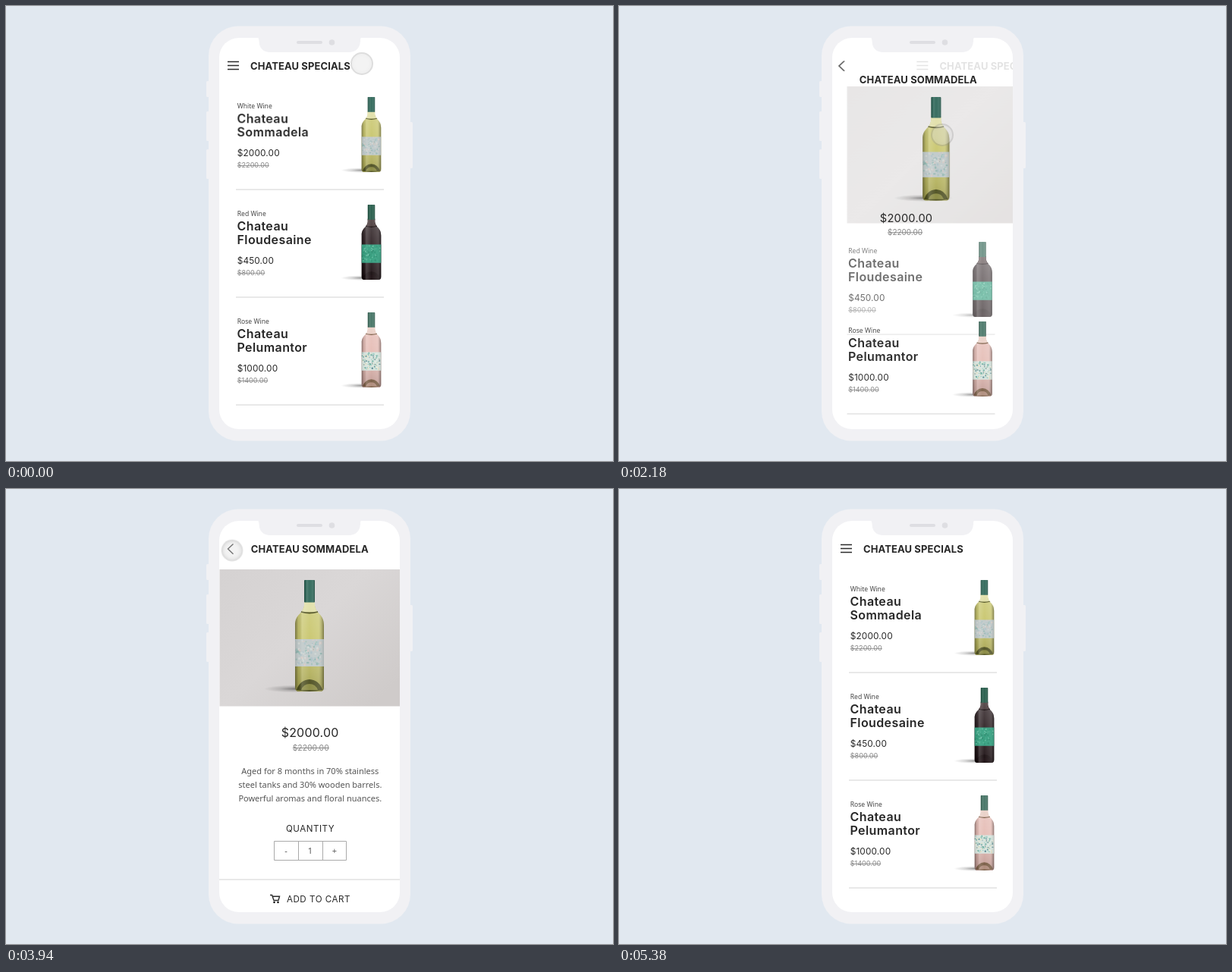
These frames come from a looping animation (800 px wide and 600 px high, 5400 ms). An HTML page:

```html
<!DOCTYPE html>
<html lang="en">
<head>
<meta charset="utf-8">
<title>Wine shop</title>
<style>
  html, body { margin: 0; width: 800px; height: 600px; overflow: hidden; background: #e1e8f0; }
  body { position: relative; --ease: cubic-bezier(.37, 0, .63, 1); }
  svg { display: block; }
  text { font-family: Inter, sans-serif; fill: #262626; }

  .head { font-size: 13px; font-weight: 700; letter-spacing: .1px; }
  .name { font-size: 16px; font-weight: 600; letter-spacing: .4px; }
  .kind { font-family: "Noto Sans", sans-serif; font-size: 8.6px; fill: #444; }
  .price { font-size: 11.8px; letter-spacing: .15px; }
  .old { font-size: 9.1px; fill: #888; text-decoration: line-through; }
  .big { font-size: 16px; letter-spacing: .2px; }
  .bigold { font-size: 10.4px; fill: #888; text-decoration: line-through; }
  .body { font-family: "Noto Sans", sans-serif; font-size: 11px; fill: #555; text-anchor: middle; }
  .caps { font-size: 11.6px; letter-spacing: .5px; }
  .rule { stroke: #d2d2d2; }
  .icon { fill: none; stroke: #2b2b2b; stroke-width: 1.4; }

  .morph, .grow, .photo, .bar, .back, .list, .label, .first, .mid, .last, .detail, .cart, .cursor, .cursor::before {
    animation: 5.4s var(--ease) infinite;
  }
  .morph { animation-name: morph; }
  .swap { animation-name: morph, swap; }
  .grow { animation-name: grow; }
  .photo { animation-name: photo; }
  .bar { animation-name: bar; }
  .back { animation-name: back; }
  .list { animation-name: nudge; }
  .label { animation-name: label; }
  .first { animation-name: first; }
  .mid { animation-name: mid; }
  .last { animation-name: last; }
  .detail { animation-name: detail; }
  .cart { animation-name: cart; }

  @keyframes morph {
    0%, 31.5%, 84.7%, 100% { transform: var(--from, none); }
    46%, 74.44% { transform: var(--to, none); }
  }
  @keyframes swap {
    0%, 38.7%, 79.61%, 100% { opacity: var(--shut); }
    38.71%, 79.6% { opacity: var(--open); }
  }
  @keyframes grow {
    0%, 31.5%, 84.9%, 100% { transform: translate(81.5px, 0) scale(.673); }
    44.4%, 74.44% { transform: none; }
  }
  @keyframes photo {
    0%, 31.5%, 86.3%, 100% { transform: translate(238px, 0); }
    42.4%, 74.44% { transform: none; }
    0%, 31.5%, 85%, 100% { opacity: 0; }
    48.2%, 74.44% { opacity: 1; }
  }
  @keyframes bar {
    0%, 31.5%, 84.6%, 100% { transform: none; opacity: 1; }
    43.1%, 74.44% { transform: translate(115px, 0); opacity: 0; }
  }
  @keyframes back {
    0%, 31.5%, 78.7%, 100% { transform: translate(-20px, 0); opacity: 0; }
    43.1%, 74.44% { transform: none; opacity: 1; }
  }
  @keyframes nudge {
    0%, 31.5%, 70%, 100% { transform: none; }
    33%, 60% { transform: translate(-2.5px, 0); }
  }
  @keyframes label {
    0%, 31.5%, 88%, 100% { opacity: 1; }
    35%, 82% { opacity: 0; }
  }
  @keyframes first {
    0%, 31.5%, 80%, 100% { opacity: 1; }
    38%, 76% { opacity: 0; }
  }
  @keyframes mid {
    0%, 31.5%, 87.2%, 100% { transform: none; }
    51.9% { transform: translate(0, 123px); }
    77.9% { transform: translate(0, 80px); }
    0%, 33.5%, 87.2%, 100% { opacity: 1; }
    51%, 77.9% { opacity: 0; }
  }
  @keyframes last {
    0%, 37.7%, 88.9%, 100% { transform: none; }
    51.6% { transform: translate(0, 135px); }
    79.7% { transform: translate(0, 100px); }
    0%, 38.9%, 88.9%, 100% { opacity: 1; }
    51.2%, 79.7% { opacity: 0; }
  }
  @keyframes detail {
    0%, 39.3%, 85.7%, 100% { transform: translate(0, 160px); }
    50.7%, 74.44% { transform: none; }
    0%, 40.8%, 85.7%, 100% { opacity: 0; }
    51.2%, 74.44% { opacity: 1; }
  }
  @keyframes cart {
    0%, 49%, 86%, 100% { opacity: 0; }
    58%, 85% { opacity: 1; }
  }

  .cursor {
    position: absolute; left: 0; top: 0; width: 30px; height: 30px;
    offset-rotate: 0deg; offset-anchor: center;
    animation-name: travel;
  }
  .cursor::before {
    content: ""; position: absolute; inset: 0; box-sizing: border-box;
    border: 2px solid rgba(150, 150, 150, .32); border-radius: 50%;
    background: rgba(225, 225, 225, .4); background-clip: padding-box;
    animation-name: press;
  }
  @keyframes travel {
    0%, 11.1% { offset-path: path("M469 76C430 90 400 140 426 170"); offset-distance: 0%; }
    20.74% { offset-path: path("M469 76C430 90 400 140 426 170"); offset-distance: 100%; }
    20.75%, 62.9% { offset-path: path("M426 170C400 140 340 100 298 81"); offset-distance: 0%; }
    72.2% { offset-path: path("M426 170C400 140 340 100 298 81"); offset-distance: 100%; }
    72.21%, 88.5% { offset-path: path("M298 81C300 55 400 92 469 76"); offset-distance: 0%; }
    99.2%, 100% { offset-path: path("M298 81C300 55 400 92 469 76"); offset-distance: 100%; }
    0%, 99.5% { opacity: 1; }
    99.55%, 100% { opacity: 0; }
  }
  @keyframes press {
    0%, 26%, 31.5%, 71.5%, 75.5%, 100% { transform: none; box-shadow: inset 0 0 6px rgba(0, 0, 0, .03); }
    28.7%, 73% { transform: scale(.95); box-shadow: inset 0 0 6px rgba(0, 0, 0, .12); }
  }
</style>
</head>
<body>
<svg width="800" height="600" viewBox="0 0 800 600">
  <defs>
    <clipPath id="screen"><rect x="281" y="42" width="238" height="516" rx="26"/></clipPath>
    <linearGradient id="wall" x1="0" y1="0" x2="1" y2=".8">
      <stop offset="0" stop-color="#d5d2d2"/>
      <stop offset=".5" stop-color="#dad7d7"/>
      <stop offset="1" stop-color="#cfcbca"/>
    </linearGradient>
    <linearGradient id="shade">
      <stop offset="0" stop-color="#000" stop-opacity=".4"/>
      <stop offset=".12" stop-color="#000" stop-opacity=".08"/>
      <stop offset=".24" stop-color="#fff" stop-opacity=".2"/>
      <stop offset=".5" stop-color="#fff" stop-opacity=".06"/>
      <stop offset=".82" stop-color="#fff" stop-opacity=".16"/>
      <stop offset="1" stop-color="#000" stop-opacity=".4"/>
    </linearGradient>
    <linearGradient id="depth" x2="0" y2="1">
      <stop offset="0" stop-color="#fff" stop-opacity=".22"/>
      <stop offset=".4" stop-color="#fff" stop-opacity=".1"/>
      <stop offset="1" stop-color="#000" stop-opacity=".18"/>
    </linearGradient>
    <radialGradient id="shadow">
      <stop offset="0" stop-color="#000" stop-opacity=".42"/>
      <stop offset=".5" stop-color="#000" stop-opacity=".15"/>
      <stop offset="1" stop-color="#000" stop-opacity="0"/>
    </radialGradient>
  </defs>

  <g fill="#f1f1f4">
    <rect x="267" y="26.5" width="266" height="547" rx="39"/>
    <rect x="264" y="99" width="5" height="21" rx="1.5"/>
    <rect x="264" y="139" width="5" height="39" rx="1.5"/>
    <rect x="264" y="189" width="5" height="39" rx="1.5"/>
    <rect x="531" y="153" width="5" height="61" rx="1.5"/>
  </g>
  <rect x="281" y="42" width="238" height="516" rx="26" fill="#fff"/>

  <g clip-path="url(#screen)">
    <rect class="photo" x="281.5" y="106" width="238" height="180.5" fill="url(#wall)"/>

    <g class="bar">
      <path class="icon" d="M292 73.5h15M292 78.5h15M292 83.5h15"/>
      <text class="head" x="322" y="83.6">CHATEAU SPECIALS</text>
    </g>
    <path class="icon back" d="M299.5 72.5L292.5 79L299.5 85.7"/>

    <g class="list">
      <text class="kind label" x="304.7" y="135">White Wine</text>
      <path class="rule first" d="M303 242H498"/>
      <g id="rows"></g>
    </g>

    <g class="detail">
      <text class="body" x="400.8" y="375.5">Aged for 8 months in 70% stainless</text>
      <text class="body" x="400.8" y="393.5">steel tanks and 30% wooden barrels.</text>
      <text class="body" x="400.8" y="411.5">Powerful aromas and floral nuances.</text>
      <text class="caps" x="401" y="451.8" text-anchor="middle">QUANTITY</text>
      <path d="M353.5 464.5h95v25h-95zM385.5 464.5v25M417.5 464.5v25" fill="none" stroke="#aaa"/>
      <text class="body" x="369" y="481">-</text>
      <text class="body" x="401" y="481">1</text>
      <text class="body" x="433" y="481">+</text>
      <path class="rule" d="M281 515H519"/>
      <g class="cart">
        <path class="icon" d="M348 535.5h2.6l2.4 7h6l1.5-5.2h-9"/>
        <circle cx="353.5" cy="545" r="1.2"/><circle cx="358.5" cy="545" r="1.2"/>
        <text class="caps" x="370" y="544.5">ADD TO CART</text>
      </g>
    </g>

    <g transform="translate(400 120)"><g class="grow" id="hero"></g></g>

    <g transform="translate(304.5 157.5)">
      <g class="morph swap" style="--to: translate(18px, -78.5px) scale(1.13, .25); --shut: 1; --open: 0">
        <text class="name" y="-3.5">Chateau</text>
        <text class="name" y="14.5">Sommadela</text>
      </g>
    </g>
    <g transform="translate(322.7 79)">
      <text class="head morph swap" y="4.6" style="--from: translate(-18px, 57.6px); --shut: 0; --open: 1">CHATEAU SOMMADELA</text>
    </g>
    <g transform="translate(362.7 321)">
      <text class="big morph" y="5.8" style="--from: translate(-58px, -127px) scale(.74)">$2000.00</text>
    </g>
    <g transform="translate(377.7 341)">
      <text class="bigold morph" y="3.8" style="--from: translate(-73px, -131px) scale(.876)">$2200.00</text>
    </g>
  </g>

  <path d="M331 40H469Q467 42 467 46Q466 61 451 61H349Q334 61 333.5 46Q333 42 331 40Z" fill="#f1f1f4"/>
  <rect x="383" y="46" width="34" height="4" rx="2" fill="#dedee2"/>
  <circle cx="429.5" cy="48" r="3.8" fill="#dedee2"/>
</svg>
<div class="cursor"></div>

<script>
  const GLASS = 'M-7 28H7V34C8 45 19 44 19 60V141Q19 147 14 147H-14Q-19 147 -19 141V60C-19 44 -8 45 -7 34Z';

  function seeded(seed) {
    return () => (seed = seed * 16807 % 2147483647) / 2147483647;
  }

  function specks(colors, seed) {
    const rnd = seeded(seed);
    let out = '';
    for (let i = 0; i < 110; i++) {
      const x = -19 + rnd() * 34.5, y = 78 + rnd() * 32.5;
      const w = 1 + rnd() * 2.5, h = 1 + rnd() * 2.5;
      const color = colors[Math.floor(rnd() * colors.length)];
      out += `<rect x="${x.toFixed(1)}" y="${y.toFixed(1)}" width="${w.toFixed(1)}" height="${h.toFixed(1)}" rx=".8" fill="${color}" opacity=".75"/>`;
    }
    return out;
  }

  // Drawn 147 units tall, centred on x = 0, top at y = 0.
  function bottle({ foil, glass, neck, base, label, dots, seed }) {
    return `
      <ellipse cx="-18" cy="143.5" rx="42" ry="5" fill="url(#shadow)"/>
      <path d="${GLASS}" fill="${glass}"/>
      <path d="M-7 28H7V34Q8 39 11 42.5H-11Q-8 39 -7 34Z" fill="${neck}"/>
      <path d="${GLASS}" fill="url(#depth)"/>
      <path d="M-11 42Q0 45 11 42" fill="none" stroke="${base}" stroke-width="1.8"/>
      <path d="M-17 145Q-13 132 0 131Q13 132 17 145Q0 149 -17 145Z" fill="${base}"/>
      <path d="M-11 145Q-8 137 0 137Q8 137 11 145Z" fill="${glass}" opacity=".5"/>
      <path d="${GLASS}" fill="url(#shade)"/>
      <rect x="-19" y="78" width="38" height="36" fill="${label}"/>
      ${specks(dots, seed)}
      <rect x="-19" y="78" width="38" height="36" fill="url(#shade)" opacity=".3"/>
      <rect x="-7" width="14" height="29.5" rx="1" fill="${foil}"/>
      <rect x="-7" width="14" height="29.5" rx="1" fill="url(#shade)" opacity=".7"/>`;
  }

  const WHITE = {
    foil: '#30685a', glass: '#c2bf5c', neck: '#d9d792', base: '#4a4c1c', label: '#c2cbcb',
    dots: ['#9dc0ba', '#adc3c9', '#d6dcda', '#dccbc4', '#8ab3ac'], seed: 11
  };
  const RED = {
    foil: '#265c4a', glass: '#180a0d', neck: '#200d0e', base: '#120709', label: '#3aa283',
    dots: ['#2c8a6e', '#58b99b', '#7cc9b0', '#339878'], seed: 29
  };
  const ROSE = {
    foil: '#447364', glass: '#e2b4ac', neck: '#e4c4b8', base: '#75583f', label: '#d8e5df',
    dots: ['#4f9f90', '#8cc4b8', '#f3efdf', '#4b7d88', '#e8d9b4'], seed: 47
  };

  function row(index, motion, kind, name, price, old, wine) {
    return `<g transform="translate(0 ${142 * index})"><g class="${motion}">
      <text class="kind" x="304.7" y="135">${kind}</text>
      <text class="name" x="304.5" y="154">Chateau</text>
      <text class="name" x="304.5" y="172">${name}</text>
      <text class="price" x="304.7" y="198.3">${price}</text>
      <text class="old" x="304.7" y="213.3">${old}</text>
      <path class="rule" d="M303 242H498"/>
      <g transform="translate(481.5 120) scale(.673)">${bottle(wine)}</g>
    </g></g>`;
  }

  document.getElementById('hero').innerHTML = bottle(WHITE);
  document.getElementById('rows').innerHTML =
    row(1, 'mid', 'Red Wine', 'Floudesaine', '$450.00', '$800.00', RED) +
    row(2, 'last', 'Rose Wine', 'Pelumantor', '$1000.00', '$1400.00', ROSE);
</script>
</body>
</html>
```
